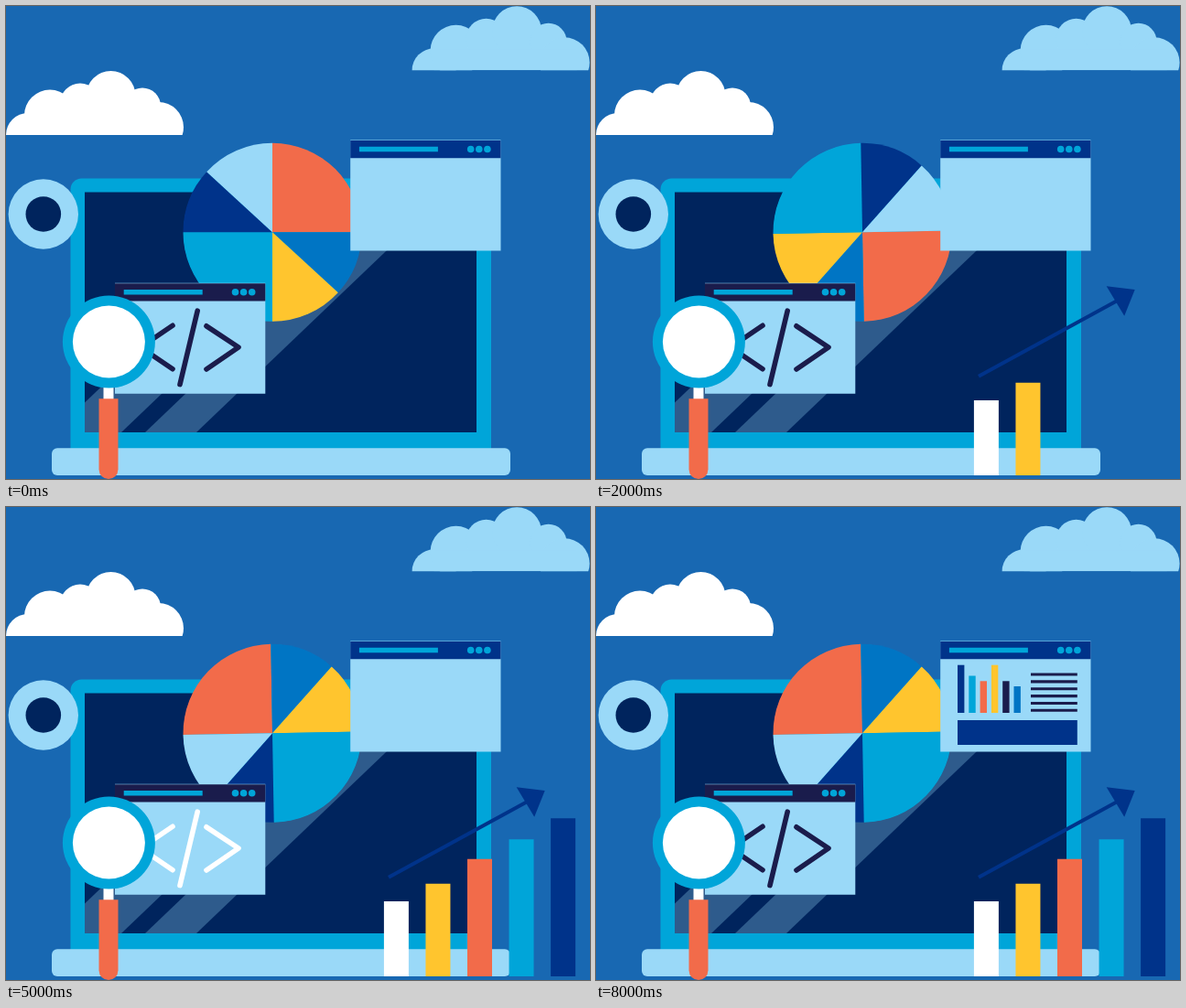
Recreate the animation shown at these times as an HTML page with a canvas. Size 638x517 px, loop 9 s.

```html
<!DOCTYPE html>
<html lang="en">
<head>
<meta charset="utf-8">
<title>Data dashboard</title>
<style>
html, body { margin: 0; width: 100%; height: 100%; overflow: hidden; background: #1868b2; }
canvas { display: block; }
</style>
</head>
<body>
<canvas id="stage" width="638" height="517"></canvas>
<script>
const ctx = document.getElementById('stage').getContext('2d');
const STEP = 1000, STEPS = 9;
const C = {
  sky: '#1868b2', light: '#9ad9f8', cyan: '#00a5d9', blue: '#0075c4', navy: '#00338a',
  deep: '#00245d', ink: '#1a1c4c', coral: '#f26b4a', yellow: '#ffc52e',
  white: '#ffffff', shine: '#2e5b8c'
};
// Pie rotation in degrees for each step; it rests after the last one.
const TURNS = [0, 46, 89, 180, 226, 269];
// Slice starts, clockwise from the top.
const SLICES = [[0, 'coral'], [90, 'blue'], [132.6, 'yellow'], [180, 'cyan'], [270, 'navy'], [312.6, 'light']];
const BUMPS = [[24, 141, 24], [48, 119.5, 28], [81, 106.5, 22], [114.5, 98, 27], [149, 109.5, 20], [166.5, 132.5, 27.5]];
const BARS = [['white', 431], ['yellow', 411.7], ['coral', 384.7], ['cyan', 363.3], ['navy', 340.2]];
const MINI = [['navy', 172.7], ['cyan', 184.5], ['coral', 190.3], ['yellow', 172.7], ['ink', 190.3], ['blue', 196]];

function rect(color, x0, y0, x1, y1, r = 0) {
  ctx.fillStyle = color;
  ctx.beginPath();
  ctx.roundRect(x0, y0, x1 - x0, y1 - y0, r);
  ctx.fill();
}

function disc(color, x, y, r) {
  ctx.fillStyle = color;
  ctx.beginPath();
  ctx.arc(x, y, r, 0, Math.PI * 2);
  ctx.fill();
}

function trace(points) {
  ctx.beginPath();
  points.forEach(([x, y]) => ctx.lineTo(x, y));
}

function poly(color, points) {
  ctx.fillStyle = color;
  trace(points);
  ctx.fill();
}

function stroke(color, width, points, cap = 'round') {
  ctx.strokeStyle = color;
  ctx.lineWidth = width;
  ctx.lineCap = cap;
  ctx.lineJoin = 'round';
  trace(points);
  ctx.stroke();
}

function cloud(color, dx, dy) {
  ctx.save();
  ctx.translate(dx, dy);
  ctx.beginPath();
  ctx.rect(-2, 60, 200, 81);
  ctx.clip();
  BUMPS.forEach(b => disc(color, ...b));
  rect(color, 24, 118, 180, 141);
  ctx.restore();
}

function shine(left, right) {
  const rise = 262, run = 274;
  poly(C.shine, [[left, 466], [right, 466], [right + run, 466 - rise], [left + run, 466 - rise]]);
}

function laptop() {
  rect(C.cyan, 70.5, 188.5, 530, 490, [12, 12, 0, 0]);
  rect(C.deep, 86, 203.5, 514, 466);
  ctx.save();
  ctx.beginPath();
  ctx.rect(86, 203.5, 428, 262.5);
  ctx.clip();
  shine(52, 126);
  shine(152, 208);
  ctx.restore();
  rect(C.light, 50, 483.3, 551, 513, 6);
}

function pie(turn) {
  const rad = deg => (deg + turn - 90) * Math.PI / 180;
  disc(C.cyan, 291, 247.3, 97);
  SLICES.forEach(([start, name], i) => {
    const end = i + 1 < SLICES.length ? SLICES[i + 1][0] : 360;
    ctx.fillStyle = C[name];
    ctx.beginPath();
    ctx.moveTo(291, 247.3);
    ctx.arc(291, 247.3, 97.5, rad(start), rad(end));
    ctx.fill();
  });
}

function panel(x, y, header) {
  rect(C.light, x, y, x + 164.3, y + 121);
  rect(header, x, y + 0.6, x + 164.3, y + 19.7);
  rect(C.cyan, x + 9.7, y + 7.2, x + 95.7, y + 12.7);
  for (let i = 0; i < 3; i++) disc(C.cyan, x + 131.5 + i * 9.1, y + 10, 3.8);
}

function code(color) {
  stroke(color, 5.6, [[182, 349.3], [147, 373], [182, 396.7]]);
  stroke(color, 5.6, [[209.2, 333.2], [190, 413.6]]);
  stroke(color, 5.6, [[219, 349.8], [254, 373], [219, 397]]);
}

function lens() {
  rect(C.white, 106.5, 410, 117.5, 431);
  rect(C.coral, 101.5, 429.3, 122.5, 517, [0, 0, 10.5, 10.5]);
  disc(C.cyan, 112.4, 367, 50.5);
  disc(C.white, 112.4, 367, 39.5);
}

function report(step) {
  if (step >= 6) MINI.forEach(([name, top], i) => {
    const x = 395 + i * 12.3;
    rect(C[name], x, top, x + 7.4, 225);
  });
  if (step >= 7) for (let i = 0; i < 6; i++) {
    const y = 181.5 + i * 7.85;
    rect(C.ink, 475, y, 525.8, y + 3.1);
  }
  if (step >= 8) rect(C.navy, 395, 233, 525.8, 260);
}

function growth(step) {
  BARS.slice(0, step).forEach(([name, top], i) => {
    const x = 412.9 + i * 45.55;
    rect(C[name], x, top, x + 27, 513);
  });
  if (step >= 1) {
    stroke(C.navy, 4, [[418, 404.7], [570, 321.8]], 'butt');
    poly(C.navy, [[557.7, 306.3], [588.7, 310], [577.2, 338.8]]);
  }
}

function draw(step) {
  rect(C.sky, 0, 0, 638, 517);
  cloud(C.white, 0, 0);
  cloud(C.light, 443.6, -70.7);
  laptop();
  disc(C.light, 40.8, 227.5, 38.2);
  disc(C.deep, 40.8, 227.5, 19.3);
  pie(TURNS[Math.min(step, TURNS.length - 1)]);
  panel(376.2, 146.5, C.navy);
  report(step);
  panel(119, 302.7, C.ink);
  code(step % 2 ? C.white : C.ink);
  lens();
  growth(step);
}

const began = performance.now();
function tick() {
  const t = Math.max(0, performance.now() - began);
  draw(Math.floor(t / STEP) % STEPS);
  requestAnimationFrame(tick);
}
tick();
</script>
</body>
</html>
```
